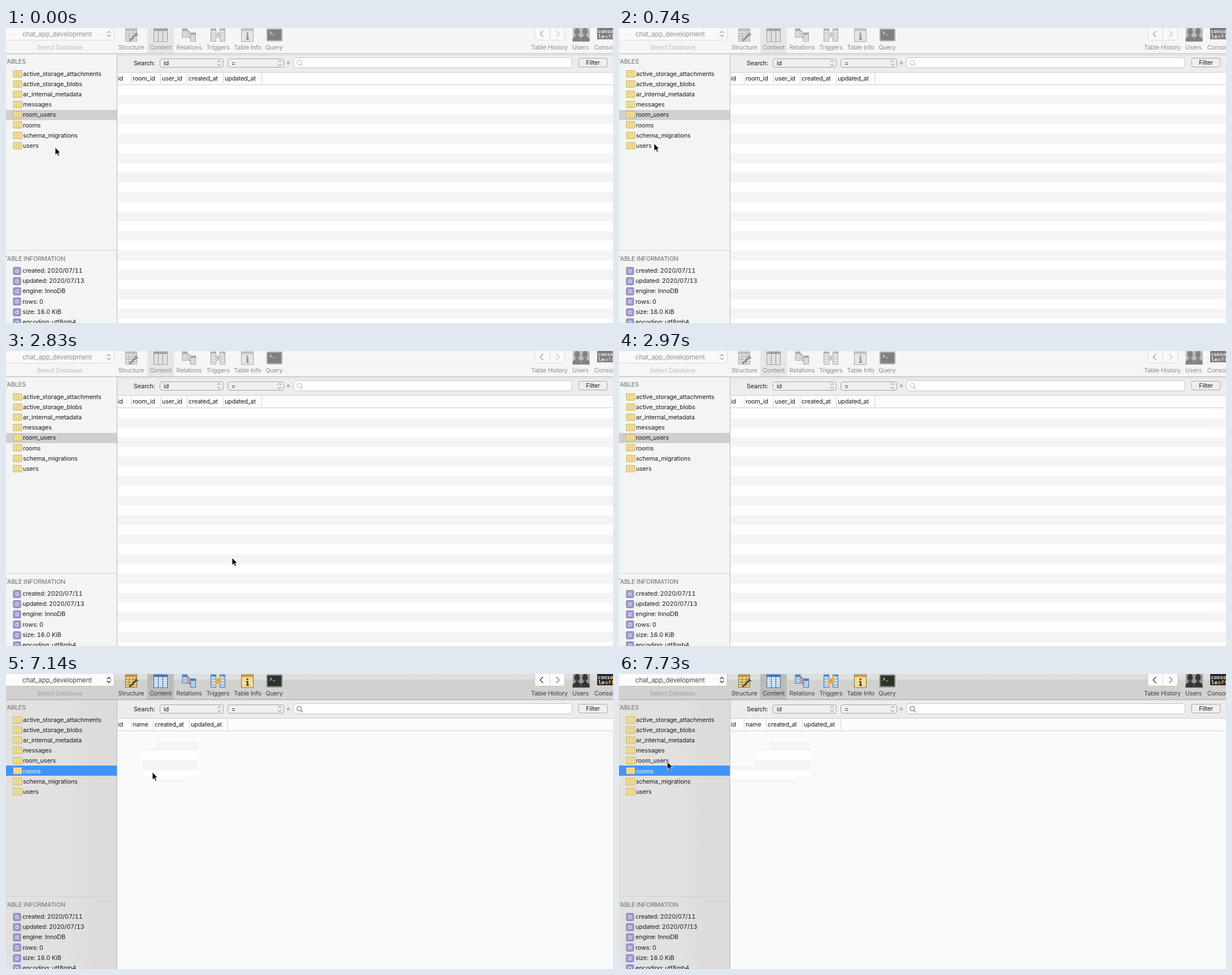
An HTML page for the animation above (8 s loop, 1074 px wide and 522 px high).

```html
<!DOCTYPE html>
<html lang="en">
<head>
<meta charset="utf-8">
<title>Database browser</title>
<style>
html, body { margin: 0; width: 100%; height: 100%; overflow: hidden; background: #f3f5f4; }
svg { display: block; width: 1074px; height: 522px; animation: theme 8s step-end infinite; }
text { font: 10.8px Inter, "Liberation Sans", sans-serif; letter-spacing: -.17px; font-variant-numeric: tabular-nums; fill: #1c1c1c; }

/* Window focus, plus the table areas repainted behind the pointer */
@keyframes theme {
  0% {
    --bar-top: #f5f6f5; --bar: #f4f5f4; --bar-line: #b0b1b0; --tab: #e5e6e5;
    --side: #f3f5f4; --tools: #ecedec; --field: #fdfefd;
    --label: #8d8d8d; --faint: #bcbdbc; --db: #929392; --edge: #d9dad9;
    --button: #f8f9f8; --glyph: #a2a3a2; --lens: #b4b5b4; --gray: 1; --icon: .6;
    --idle: 1; --active: 0; --p1: 0; --p2: 0; --p3: 0; --p4: 0; --p5: 0;
  }
  81.75% {
    --bar-top: #dededd; --bar: #d1d1d0; --bar-line: #a3a3a2; --tab: #bcbcbb;
    --side: #e2e1df; --tools: #ebeceb; --field: #fefefe;
    --label: #3e3e3e; --faint: #a09f9e; --db: #4a4a4a; --edge: #c2c2c1;
    --button: #fcfcfb; --glyph: #333; --lens: #5c5c5c; --gray: 0; --icon: 1;
    --idle: 0; --active: 1;
  }
  83.625% { --p1: 1; }
  85.5% { --p2: 1; }
  87.375% { --p3: 1; }
  89.25% { --p4: 1; }
  91.125% { --p5: 1; }
}
@keyframes point {
  0% { transform: translate(86px, 210.5px); }
  1.875% { transform: translate(85px, 209px); }
  5.625% { transform: translate(83px, 208px); }
  7.375% { transform: translate(72px, 203.5px); }
  9.25% { transform: translate(61px, 203.5px); }
  11.125% { transform: translate(51px, 205px); }
  13% { transform: translate(49px, 208px); }
  14.75% { transform: translate(47.5px, 207.5px); }
  16.625% { transform: translate(46.5px, 207px); }
  35.375% { transform: translate(399px, 365px); }
  37.125% { transform: translate(-50px, -50px); }
  81.75% { transform: translate(326px, 114px); }
  83.625% { transform: translate(267px, 161px); }
  85.5% { transform: translate(242px, 134px); }
  87.375% { transform: translate(299px, 154px); }
  89.25% { transform: translate(258px, 173px); }
  91.125% { transform: translate(140px, 164px); }
  93% { transform: translate(95px, 157px); }
  94.875% { transform: translate(84px, 156px); }
  96.625%, 100% { transform: translate(84.5px, 154.5px); }
}
#cursor { animation: point 8s step-end infinite; }
.idle { opacity: var(--idle); }
.active { opacity: var(--active); }
.side { fill: var(--side); }
.tools { fill: var(--tools); }
.tab { fill: var(--tab); }
.icons { filter: grayscale(var(--gray)) opacity(var(--icon)); }
.field { fill: var(--field); stroke: #c3c4c3; }
.button { fill: var(--button); stroke: var(--edge); }
.control { fill: #eeefee; stroke: #a3a4a3; }
.stroke { fill: none; stroke: var(--glyph); stroke-width: 1.3; stroke-linecap: round; stroke-linejoin: round; }
.small { fill: none; stroke: #6d6d6d; stroke-width: 1; }
.lens { fill: none; stroke: var(--lens); stroke-width: 1.1; }
.mid { text-anchor: middle; }
.label { fill: var(--label); }
.faint { fill: var(--faint); }
.db { font-size: 11.6px; fill: var(--db); }
.head { fill: #7d7e7d; font-weight: 500; text-anchor: end; }
.item { letter-spacing: -.13px; }
.white { fill: #fff; }
.mono { font: bold 9px "DejaVu Sans Mono", monospace; letter-spacing: 0; fill: #eee; }
</style>
</head>
<body>
<svg viewBox="0 0 1074 522" xmlns="http://www.w3.org/2000/svg">
  <defs>
    <linearGradient id="bar" x2="0" y2="1">
      <stop offset="0" style="stop-color:var(--bar-top)"/>
      <stop offset=".2" style="stop-color:var(--bar-top)"/>
      <stop offset=".24" style="stop-color:var(--bar)"/>
      <stop offset="1" style="stop-color:var(--bar)"/>
    </linearGradient>
    <linearGradient id="shade">
      <stop offset=".5" stop-color="#dddcda" stop-opacity="0"/>
      <stop offset=".8" stop-color="#dddcda"/>
    </linearGradient>
    <radialGradient id="glow">
      <stop offset="0" stop-color="#dce6ec"/>
      <stop offset="1" stop-color="#dce6ec" stop-opacity="0"/>
    </radialGradient>
    <pattern id="rows" patternUnits="userSpaceOnUse" x="0" y="101" width="60" height="34.44">
      <rect width="60" height="34.44" fill="#fefefe"/>
      <rect y="17.22" width="60" height="17.22" fill="#f3f4f3"/>
    </pattern>
    <g id="grid">
      <rect x=".5" y=".5" width="15" height="11.5" fill="#fbf0b5" stroke="#c9a54a"/>
      <path d="M1 3.5H15M1 6.5H15M1 9.5H15M5.5 1V12M10.5 1V12" stroke="#d9b960" stroke-width=".9"/>
    </g>
    <g id="gear">
      <rect x=".5" y=".5" width="13" height="13" rx="1.5" fill="#a09ecf" stroke="#7876ac"/>
      <circle cx="7" cy="7" r="2.7" fill="#f1f1fa"/>
      <circle cx="7" cy="7" r="1.2" fill="#55528f"/>
    </g>
    <g id="column">
      <rect x=".5" y=".5" width="9" height="15" fill="#c3dcf3" stroke="#4f6f92"/>
      <rect x="1" y="1" width="8" height="3.5" fill="#4385cb"/>
      <path d="M1 8H9M1 12H9" stroke="#6f9ccb"/>
    </g>
    <g id="bust">
      <ellipse cx="8" cy="6.5" rx="5" ry="6.8"/>
      <path d="M0 24V19Q1 16 5.5 14.5V11H10.5V14.5Q15 16 16 19V24Z"/>
    </g>
    <path id="arrows" d="M-3 -1.8L0 -4.8L3 -1.8M-3 1.8L0 4.8L3 1.8"/>
  </defs>

  <!-- Toolbar -->
  <rect width="1074" height="46" fill="url(#bar)"/>
  <rect class="tab" x="250" width="47" height="45"/>
  <rect class="button" x="-8" y="-6" width="199.5" height="27.5" rx="5"/>
  <text class="db" x="29" y="14.8">chat_app_development</text>
  <use href="#arrows" class="stroke" x="182" y="10.5"/>
  <text class="mid faint" x="95" y="38">Select Database</text>
  <rect class="button" x="935.5" y="-6" width="53" height="27.5" rx="4"/>
  <path d="M962 0V21" stroke="#d2d3d2"/>
  <path class="stroke" d="M950 5.5L945 10.5L950 15.5"/>
  <path class="stroke" d="M974 5.5L979 10.5L974 15.5" opacity=".6"/>
  <g id="labels"></g>

  <g class="icons">
    <g transform="translate(211 0)">
      <rect x=".5" y="1.5" width="20" height="22" fill="#f0d581" stroke="#8a733d"/>
      <rect x="1" y="2" width="19" height="3.5" fill="#c79a3c"/>
      <path d="M1 10H20M1 14.5H20M1 19H20M7 6V23M14 6V23" stroke="#8c733b"/>
      <path d="M8 22.5L19 11.5" stroke="#3c3c3c" stroke-width="2.6"/>
      <path d="M19 7.5V12H23" fill="none" stroke="#4d4d4d" stroke-width="2"/>
    </g>
    <g transform="translate(261 0)">
      <rect x=".5" y="1.5" width="24" height="22.5" fill="#dcebf9" stroke="#45688d"/>
      <path d="M1 2H24V5.5H1Z" fill="#3f80c7"/>
      <path d="M1 9.5H24M1 13H24M1 16.5H24M1 20H24" stroke="#9fbcd9" stroke-width=".9"/>
      <path d="M8.5 2V24M16.5 2V24" stroke="#45688d"/>
    </g>
    <use href="#column" x="311.5" y="1"/>
    <use href="#column" x="326" y="8"/>
    <path d="M321 6H324V17H326" fill="none" stroke="#cb4747" stroke-width="1.5"/>
    <path d="M362.5 1.5H371.5V23.5H362.5ZM378.5 1.5H387.5V23.5H378.5Z" fill="#c3dcf3" stroke="#4f6f92"/>
    <path d="M363 3H371M379 3H387" stroke="#4385cb" stroke-width="3"/>
    <path d="M363 9H371M363 14H371M363 19H371M379 9H387M379 14H387M379 19H387" stroke="#6f9ccb"/>
    <path d="M383 2L367 13.5H373.5L367 23L384 10.5H377.5Z" fill="#f59a2c" stroke="#fff2dc" stroke-width=".6"/>
    <g transform="translate(416 0)">
      <rect x=".5" y="1.5" width="21" height="22.5" fill="#f5dc91" stroke="#88733d"/>
      <rect x="1" y="2" width="20" height="3.5" fill="#d5a439"/>
      <circle cx="11.2" cy="9.5" r="1.7" fill="#4c4433"/>
      <path d="M8.5 12.5H12.8V19.5H14.5V21H8.5V19.5H10V14H8.5Z" fill="#4c4433"/>
    </g>
    <g transform="translate(461 1)">
      <rect x=".5" y=".5" width="27" height="21.5" rx="1" fill="#8b8e89" stroke="#70736e"/>
      <rect x="2" y="2" width="24" height="18.5" fill="#2b322b"/>
      <path d="M5.5 5.5L9.5 8L5.5 10.5M11 11H15" fill="none" stroke="#b4d59e" stroke-width="1.2"/>
    </g>
    <rect x="1003" y="-1" width="30" height="25" fill="#9a9a9a"/>
    <g fill="#363636" stroke="#8a8a8a" stroke-width=".6">
      <use href="#bust" x="1002.5"/>
      <use href="#bust" x="1016.5"/>
    </g>
    <rect x="1046" y="-2" width="34" height="22" fill="#292929"/>
    <text class="mono" x="1047" y="9">conso</text>
    <text class="mono" x="1048" y="18">le<tspan fill="#e9a943" dx="1">off</tspan></text>
  </g>

  <!-- Filter bar -->
  <rect class="tools" x="197" y="46" width="877" height="32"/>
  <path d="M197 48.5H1074" stroke="#d9dad9" class="idle"/>
  <text x="226" y="66">Search:</text>
  <rect class="control" x="272.5" y="54.5" width="112" height="15" rx="3.5"/>
  <rect class="control" x="392.5" y="54.5" width="99" height="15" rx="3.5"/>
  <text x="279" y="66">id</text>
  <text x="399" y="66">=</text>
  <use href="#arrows" class="small" x="377" y="62"/>
  <use href="#arrows" class="small" x="484" y="62"/>
  <circle cx="499.5" cy="61.8" r="2.4" fill="#c3c4c3" stroke="#a2a3a2" stroke-width=".8"/>
  <rect class="field" x="509" y="52.5" width="492.5" height="18" rx="4.5"/>
  <path class="lens" d="M522 64.5L525 67.8M523 61.3A4 4 0 1 1 515 61.3A4 4 0 1 1 523 61.3"/>
  <rect class="control" x="1013" y="53.5" width="51" height="15.5" rx="3.5"/>
  <text class="mid" x="1038.5" y="65.3">Filter</text>

  <!-- Table -->
  <rect x="197" y="78" width="877" height="23" fill="#fbfcfb"/>
  <rect class="idle" x="197" y="101" width="877" height="421" fill="url(#rows)"/>
  <rect class="active" x="197" y="101" width="877" height="421" fill="#f9fbfa"/>
  <g id="patches" fill="url(#rows)"></g>
  <path d="M197 78.5H1074M197 100.5H1074" stroke="#cdcecd"/>
  <g id="headings"></g>

  <!-- Sidebar -->
  <rect class="side" y="46" width="197" height="476"/>
  <rect class="active" y="46" width="197" height="476" fill="url(#shade)"/>
  <ellipse class="active" cx="45" cy="530" rx="110" ry="45" fill="url(#glow)"/>
  <rect class="idle" y="145" width="197" height="18" fill="#cfd0cf"/>
  <rect class="active" y="162" width="197" height="18" fill="#3f95fc"/>
  <path d="M0 393.5H197" stroke="#cfd0cf"/>
  <path d="M196.5 46V522" stroke="#b9bab9"/>
  <path d="M0 45.5H1074" style="stroke:var(--bar-line)"/>
  <text class="head" x="35" y="63">TABLES</text>
  <text class="head" x="105" y="411.5">TABLE INFORMATION</text>
  <g id="lists"></g>
  <text class="item active white" x="30" y="175.5">rooms</text>

  <path id="cursor" d="M1 .8V14.2L4.1 11.4L6.3 16.2L8.5 15.2L6.4 10.5H10.5Z" fill="#000" stroke="#fff" stroke-width=".9"/>
</svg>
<script>
const put = (id, parts) => { document.getElementById(id).innerHTML = parts.join(""); };
const text = (x, y, s, cls = "") => `<text x="${x}" y="${y}" class="${cls}">${s}</text>`;
const STEP = 18.14;

put("labels", [
  [221.5, "Structure"], [273.5, "Content"], [324, "Relations"], [375, "Triggers"],
  [427.5, "Table Info"], [474.5, "Query"], [961.5, "Table History"], [1016.5, "Users"], [1061, "Console"]
].map(([x, s]) => text(x, 38, s, "label mid")));

// Each heading starts a little right of the divider before it.
const headings = (state, names, dividers) => `<g class="${state}">` +
  names.map((s, i) => text(i ? dividers[i - 1] + 2.5 : 198, 92.8, s)).join("") +
  dividers.map(x => `<path d="M${x} 80V99" stroke="#d2d3d2"/>`).join("") + "</g>";
put("headings", [
  headings("idle", ["id", "room_id", "user_id", "created_at", "updated_at"], [221.5, 273.5, 320.5, 384.5, 452.5]),
  headings("active", ["id", "name", "created_at", "updated_at"], [221.5, 260.5, 324.5, 392.5])
]);

put("patches", [
  [266, 115, 73, 65], [241, 132, 39, 48], [241, 132, 72, 40], [257, 154, 56, 37], [198, 163, 74, 28]
].map(([x, y, w, h], i) =>
  `<rect x="${x}" y="${y}" width="${w}" height="${h}" style="opacity:var(--p${i + 1})"/>`));

const list = (items, icon, textX, top) => items.map((s, i) => {
  const y = top + i * STEP;
  return `<use href="#${icon}" x="12.5" y="${Math.round(y - 6.3)}"/>` +
    text(textX, y + 3.9, s, s === "rooms" ? "item idle" : "item");
}).join("");
put("lists", [
  list(["active_storage_attachments", "active_storage_blobs", "ar_internal_metadata", "messages",
    "room_users", "rooms", "schema_migrations", "users"], "grid", 30, 81),
  list(["created: 2020/07/11", "updated: 2020/07/13", "engine: InnoDB", "rows: 0",
    "size: 16.0 KiB", "encoding: utf8mb4"], "gear", 29.3, 429.3)
]);
</script>
</body>
</html>
```
